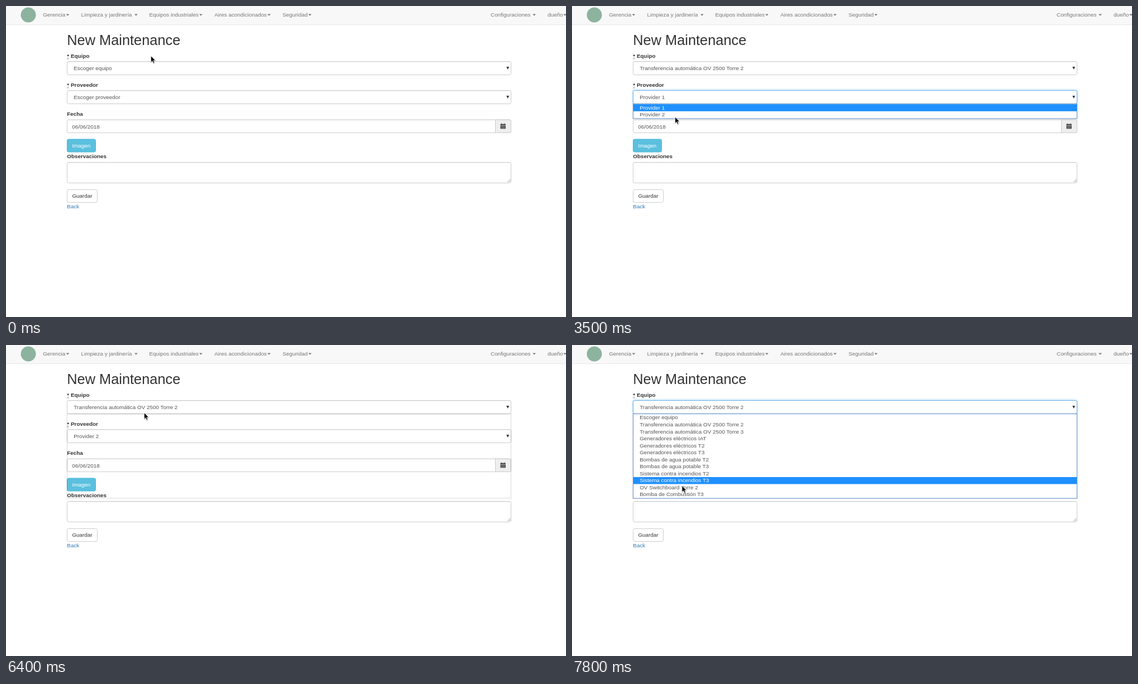
Animation, 1003 px wide and 558 px high, one loop 8 s. Source, as an HTML page:

```html
<!DOCTYPE html>
<html lang="es">
<head>
<meta charset="utf-8">
<title>New Maintenance</title>
<style>
  html, body { margin: 0; width: 100%; height: 100%; overflow: hidden; background: #fff; }
  svg { display: block; font: 9.9px "Liberation Sans", Arial, sans-serif; }
  text { white-space: pre; }
  .nav { fill: #777; }
  .value { fill: #555; }
  .label { fill: #333; font-weight: bold; }
  .box { fill: #fff; stroke: #ccc; }
  .inset { stroke: #000; stroke-opacity: .06; }
  .glow { fill: #fff; stroke: #66afe9; filter: drop-shadow(0 0 2px rgba(102, 175, 233, .6)); }
  .shade { fill: none; stroke: #000; stroke-width: 3; stroke-opacity: .06; }
</style>
</head>
<body>
<svg id="stage" width="1003" height="558" viewBox="0 0 1003 558"></svg>
<script>
const LOOP = 8000, STEP = 100, ROW = 12.55;
const LEFT = 109.5, WIDTH = 795;
const stage = document.getElementById('stage');

function add(tag, attrs, parent = stage) {
  const el = document.createElementNS('http://www.w3.org/2000/svg', tag);
  for (const key in attrs) el.setAttribute(key, attrs[key]);
  return parent.appendChild(el);
}
function write(x, y, string, cls, parent, extra) {
  const el = add('text', { x, y, class: cls, ...extra }, parent);
  el.textContent = string;
  return el;
}
const rect = (x, y, width, height, attrs, parent) => add('rect', { x, y, width, height, ...attrs }, parent);
const path = (d, attrs, parent) => add('path', { d, ...attrs }, parent);

function field(y, height, width = WIDTH) {
  rect(LEFT, y, width, height, { rx: 2.8, class: 'box' });
  path(`M${LEFT + 1.5} ${y + 1}h${width - 3}`, { class: 'inset' });
}
function label(y, string, required) {
  write(required ? 116 : 109.3, y, string, 'label');
  if (!required) return;
  write(109.3, y, '*', 'label');
  for (const dy of [1, 2.6])
    path(`M109.5 ${y + dy}h3.6`, { stroke: '#555', 'stroke-width': .8, 'stroke-dasharray': '1 .8' });
}
function select(y) {
  field(y, 24);
  const glow = rect(LEFT, y, WIDTH, 24, { rx: 2.8, class: 'glow' });
  const text = write(121.2, y + 15.5, '', 'value');
  path(`M896.2 ${y + 9.6}h5l-2.5 5z`, { fill: '#333' });
  return { glow, text };
}
function popup(y, items) {
  const height = items.length * ROW + 1;
  const shade = rect(LEFT, y, WIDTH, height, { class: 'shade' });
  const body = add('g', {});
  rect(LEFT, y, WIDTH, height, { fill: '#fff', stroke: '#5b8fce' }, body);
  const bar = rect(LEFT + .5, 0, WIDTH - 1, ROW, { fill: '#1e90ff' }, body);
  const rows = items.map((item, i) => write(121.2, y + 9.9 + i * ROW, item, '', body));
  return (shadow, opacity, active) => {
    shade.style.opacity = shadow;
    body.style.opacity = opacity;
    bar.setAttribute('y', y + .5 + active * ROW);
    rows.forEach((row, i) => row.setAttribute('fill', i === active ? '#fff' : '#555'));
  };
}

// Navigation bar
rect(0, 0, 1003, 33, { fill: '#f8f8f8' });
rect(0, 33, 1003, 1, { fill: '#e7e7e7' });
add('circle', { cx: 40, cy: 16, r: 13.5, fill: '#8db39f' });
[
  ['Gerencia', 66.2, 107.5], ['Limpieza y jardinería', 134.5, 230], ['Equipos industriales', 256.5, 346],
  ['Aires acondicionados', 373.2, 468.2], ['Seguridad', 495.2, 541.5],
  ['Configuraciones', 868, 943.2], ['dueño', 970, 998.2]
].forEach(([name, x, caret]) => {
  write(x, 19.3, name, 'nav');
  path(`M${caret} 14.6h5.8l-2.9 2.9z`, { fill: '#777' });
});

// Form
write(109.2, 70, 'New Maintenance', '', stage, { 'font-size': 25.4, fill: '#333' });
label(92.5, 'Equipo', true);
label(144.6, 'Proveedor', true);
label(197, 'Fecha');
label(273, 'Observaciones');
const equipment = select(99.5);
const provider = select(151.5);

field(204, 23.5);
path('M876.5 204h25.2a2.8 2.8 0 0 1 2.8 2.8v17.9a2.8 2.8 0 0 1-2.8 2.8h-25.2z', { fill: '#eee', stroke: '#ccc' });
write(118.3, 219.5, '06/06/2018', 'value');
rect(885.5, 211.7, 9.4, 8.6, { rx: .6, fill: '#444' });
path('M885.5 214.3h9.4', { stroke: '#eee', 'stroke-width': .7 });
path('M886.2 216.2h8M886.2 218.2h8M888 215v4.6M890.2 215v4.6M892.4 215v4.6',
  { stroke: '#aaa', 'stroke-width': .4 });
path('M887.5 210.8v1.6M893 210.8v1.6', { stroke: '#444', 'stroke-width': 1.2 });

rect(109.5, 239, 51, 23, { rx: 2.8, fill: '#5bc0de', stroke: '#46b8da' });
write(118.4, 254.2, 'Imagen', '', stage, { fill: '#fff' });
field(280.5, 37);
path('M898.5 316l5-5M901.5 316l2-2', { stroke: '#777', 'stroke-width': .8 });
rect(109.5, 329.5, 54, 23, { rx: 2.8, class: 'box' });
write(118.4, 344.4, 'Guardar', '', stage, { fill: '#333' });
write(109.3, 363.4, 'Back', '', stage, { fill: '#337ab7' });

const showEquipment = popup(123.5, [
  'Escoger equipo', 'Transferencia automática OV 2500 Torre 2', 'Transferencia automática OV 2500 Torre 3',
  'Generadores eléctricos IAT', 'Generadores eléctricos T2', 'Generadores eléctricos T3',
  'Bombas de agua potable T2', 'Bombas de agua potable T3',
  'Sistema contra incendios T2', 'Sistema contra incendios T3',
  'OV Switchboard Torre 2', 'Bomba de Combustión T3'
]);
const showProvider = popup(175.8, ['Provider 1', 'Provider 2']);

const pointer = path('M0 0V11.4L2.6 9L4.5 13L6.5 12.1L4.7 8.3H8.2Z', {
  fill: '#000', stroke: '#fff', 'stroke-width': .8,
  style: 'filter: drop-shadow(.6px 1px .7px rgba(0,0,0,.35))'
});

// Timeline: [time, x, y] for the pointer, [time, value] for hard changes
const route = [
  [0, 259.5, 89.5], [300, 253.5, 107], [1000, 253.5, 107], [1500, 193.5, 142], [1600, 193.5, 142],
  [1800, 197.5, 147.5], [2200, 197.5, 147.5], [2400, 191, 162], [2900, 191, 162], [3500, 184.5, 199],
  [3600, 184.5, 199], [4000, 177, 193.5], [4500, 177, 193.5], [5000, 245, 127], [5300, 245, 127],
  [5400, 247.5, 119.5], [6300, 247.5, 119.5], [6400, 247.5, 121.5], [7100, 211.5, 199.5],
  [7200, 211, 202], [7300, 211, 202], [7800, 197, 252.5], [LOOP, 197, 252.5]
];
const equipmentRow = [[0, 0], [1500, 1], [7100, 2], [7200, 6], [7500, 7], [7700, 8], [7800, 9]];
const providerRow = [[0, 0], [3800, 1]];
const equipmentText = [[0, 'Escoger equipo'], [2300, 'Transferencia automática OV 2500 Torre 2']];
const providerText = [[0, 'Escoger proveedor'], [2400, 'Provider 1'], [4600, 'Provider 2']];

const latest = (keys, t) => keys.filter(key => key[0] <= t).pop()[1];

function render(t) {
  const ramp = (from, to) => Math.min(1, Math.max(0, (t - from) / (to - from)));
  const after = time => t >= time ? 1 : 0;

  equipment.text.textContent = latest(equipmentText, t);
  provider.text.textContent = latest(providerText, t);
  equipment.glow.style.opacity = ramp(1200, 1400) - ramp(2900, 3100) + ramp(6400, 6600);
  provider.glow.style.opacity = ramp(3100, 3300) - ramp(5500, 5900);

  showEquipment(
    ramp(700, 1200) - after(2200) + ramp(6000, 6400),
    ramp(1200, 1400) - after(2200) + ramp(6400, 6600),
    latest(equipmentRow, t));
  showProvider(
    ramp(2700, 3100) - after(4400),
    ramp(3100, 3300) - after(4400),
    latest(providerRow, t));

  const next = route.findIndex(point => point[0] > t);
  const [t0, x0, y0] = route[next - 1], [t1, x1, y1] = route[next];
  const k = (t - t0) / (t1 - t0);
  pointer.setAttribute('transform', `translate(${x0 + (x1 - x0) * k} ${y0 + (y1 - y0) * k})`);
}

const start = performance.now();
function tick() {
  const t = (performance.now() - start) % LOOP;
  render(Math.floor(t / STEP) * STEP);
  requestAnimationFrame(tick);
}
tick();
</script>
</body>
</html>
```
